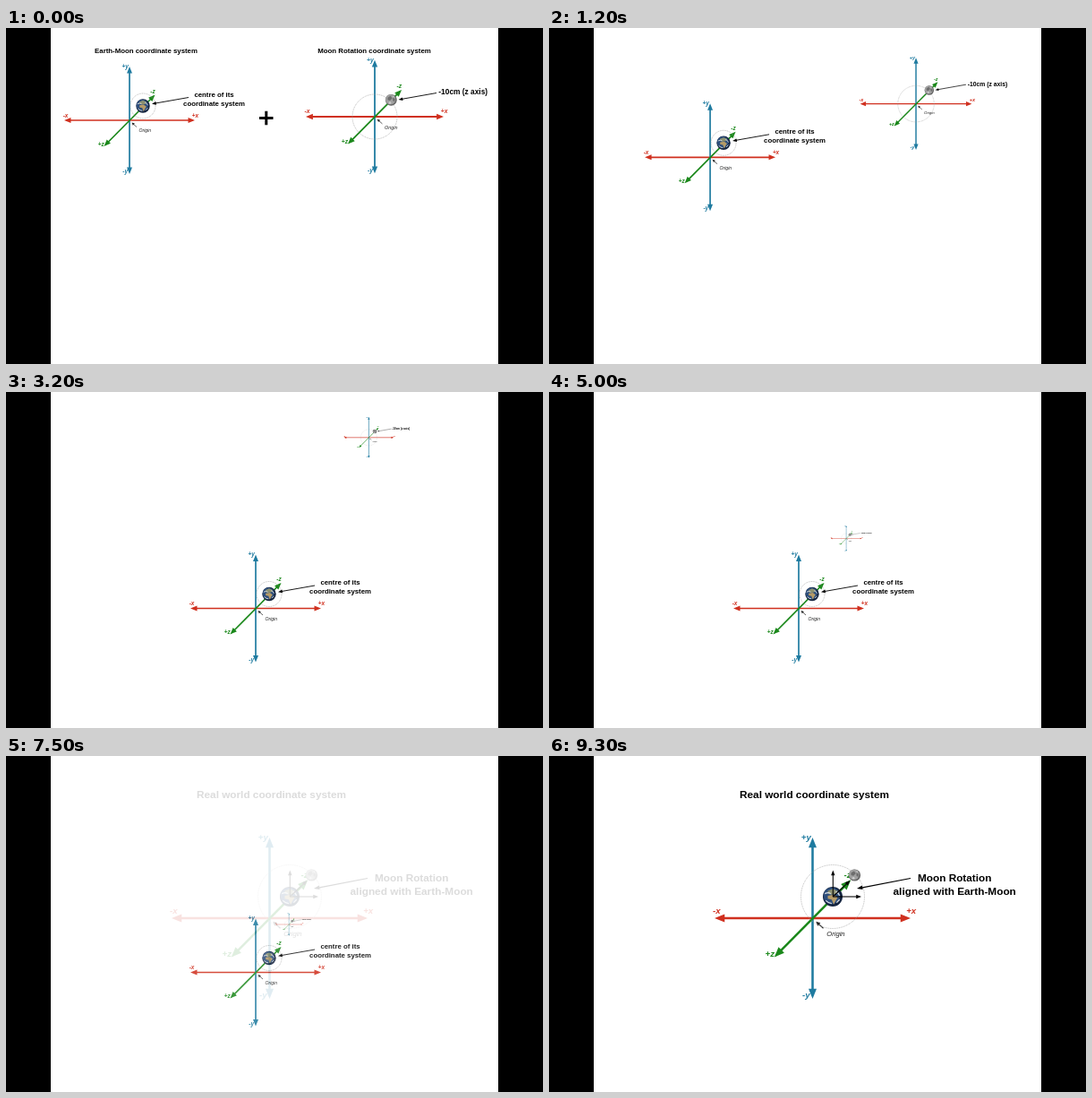
An HTML page that plays this animation: 600x375 px, repeating every 9400 ms.

```html
<!DOCTYPE html>
<html>
<head>
<meta charset="utf-8">
<style>
html, body { margin: 0; width: 100%; height: 100%; overflow: hidden; background: #000; }
svg { display: block; width: 100vw; height: 100vh; }
text { font-family: "Liberation Sans", Arial, sans-serif; text-anchor: middle; }
</style>
</head>
<body>
<svg id="stage" viewBox="0 0 600 375"></svg>
<script>
const RED = '#d0301f', BLUE = '#1f7ba0', GREEN = '#1b881b', BLACK = '#000';

// Text centred on (x, y)
const label = (s, x, y, size, fill = BLACK, style = 'bold') =>
  `<text x="${x}" y="${y + size * 0.36}" fill="${fill}" style="font:${style} ${size}px 'Liberation Sans',Arial,sans-serif">${s}</text>`;

function arrow(x1, y1, x2, y2, color, width, len, half, both) {
  const d = Math.hypot(x2 - x1, y2 - y1), ux = (x2 - x1) / d, uy = (y2 - y1) / d;
  const head = (x, y, s) => {
    const bx = x - ux * len * s, by = y - uy * len * s;
    return `M${x} ${y}L${bx - uy * half} ${by + ux * half}L${bx + uy * half} ${by - ux * half}Z`;
  };
  const cut = len * 0.8, start = both ? cut : 0;
  return `<path d="M${x1 + ux * start} ${y1 + uy * start}L${x2 - ux * cut} ${y2 - uy * cut}" stroke="${color}" stroke-width="${width}"/>
    <path d="${head(x2, y2, 1)}${both ? head(x1, y1, -1) : ''}" fill="${color}"/>`;
}

const axis = (x1, y1, x2, y2, color) => arrow(x1, y1, x2, y2, color, 1.7, 7.5, 3, true);
const callout = (x1, y1, x2, y2, s = 1) => arrow(x1, y1, x2, y2, BLACK, 0.9 * s, 4.8 * s, 1.8 * s);
const orbit = (x, y, r) =>
  `<circle cx="${x}" cy="${y}" r="${r}" fill="none" stroke="#999" stroke-width=".6" stroke-dasharray="1 .7"/>`;

const axes = scale => {
  const mark = (s, x, y, color) => label(s, x, y, 6.4, color, 'italic bold');
  return `<g transform="scale(${scale})">
    ${axis(-73, 0, 73, 0, RED)}${axis(0, -60, 0, 60, BLUE)}${axis(-28.5, 29, 28.5, -28.5, GREEN)}
    ${mark('-x', -71.5, -5.7, RED)}${mark('+x', 73.5, -5.7, RED)}
    ${mark('+y', -4.8, -60.5, BLUE)}${mark('-y', -4.8, 56.8, BLUE)}
    ${mark('-z', 26, -32.5, GREEN)}${mark('+z', -31.8, 26.3, GREEN)}
    ${arrow(8, 7.5, 2.5, 2.5, '#222', 0.7, 3.2, 1.5)}
    ${label('Origin', 17.3, 11.5, 5.1, '#222', 'italic')}</g>`;
};

const earth = (x, y, r) => `<g transform="translate(${x} ${y}) scale(${r / 10})">
  <circle r="10" fill="#14243f"/><circle cx="-1" cy="-1" r="8.4" fill="#2d4e7c"/>
  <path d="M-5 -6L0 -8L5 -6L4 -3L-1 -2L-5 -3Z" fill="#8b9070"/>
  <path d="M-5 -1L1 -2L5 1L3 4L1 8L-1 3L-5 2Z" fill="#b59b68"/>
  <path d="M-8 -3Q-4 -5 -2 -3M3 -5Q6 -4 7 -1M-7 4Q-4 7 -1 7M4 6L7 3" fill="none" stroke="#d5dce2" stroke-width="1.2"/></g>`;

const moon = (x, y, r) => `<g transform="translate(${x} ${y}) scale(${r / 10})">
  <circle r="10" fill="#666"/><circle cx="-1" cy="-1" r="8.8" fill="#a0a0a0"/>
  <path d="M-6 -4L-1 -7L2 -3L-2 1L-6 0ZM3 -4L7 -2L6 3L3 1Z" fill="#6d6d6d"/>
  <circle cx="-2" cy="5" r="2" fill="#ccc"/><circle cx="4" cy="-6" r="1.2" fill="#ccc"/></g>`;

const cross = `<path d="M283 100.5H298.5M290.8 92.7V108.3" stroke="#000" stroke-width="3"/>`;

document.getElementById('stage').innerHTML = `
  <rect width="600" height="375" fill="#000"/>
  <rect x="50" width="500" height="375" fill="#fff"/>
  <g id="titles">
    ${label('Earth-Moon coordinate system', 156.5, 25.3, 7.84)}
    ${label('Moon Rotation coordinate system', 411.5, 25.3, 7.86)}${cross}
  </g>
  <g id="earthSystem">${axes(1)}${orbit(15, -16, 14)}${earth(15, -16, 7.7)}
    ${callout(66, -25.5, 25, -18.3)}
    ${label('centre of its', 94.5, -29, 7.81)}${label('coordinate system', 94.5, -19, 7.81)}
  </g>
  <g id="moonSystem">${axes(1.055)}${orbit(0, 0, 25)}${moon(18.3, -18.7, 6.4)}
    ${callout(69, -26.5, 26.5, -19)}${label('-10cm (z axis)', 98.7, -27.8, 8.36)}
  </g>
  <g id="world">
    <rect x="50" width="500" height="375" fill="#fff"/>
    ${label('Real world coordinate system', 296.5, 42.7, 11.79)}
    <g transform="translate(294.5 181)">${axes(1.5)}</g>
    ${orbit(317, 157, 35.5)}${earth(317, 157, 11)}${moon(341.5, 133, 6.6)}
    ${callout(317.3, 157, 317.3, 127.5, 1.2)}${callout(317.3, 157, 349, 157, 1.2)}${callout(317.3, 157, 336.5, 139, 1.2)}
    ${callout(404, 136.5, 344, 148, 1.3)}
    ${label('Moon Rotation', 453.2, 136, 11.79)}${label('aligned with Earth-Moon', 453.2, 150.3, 11.83)}
  </g>`;

const LOOP = 9400, STEP = 100, MOVE = 1890;
const part = id => document.getElementById(id);
const titles = part('titles'), earthSystem = part('earthSystem'), moonSystem = part('moonSystem'), world = part('world');
const clamp = v => Math.min(1, Math.max(0, v));
const ease = (t, start) => (1 - Math.cos(Math.PI * clamp((t - start) / MOVE))) / 2;
const mix = (a, b, k) => a + (b - a) * k;

// Moon system poses: x, y, scale
const poses = [[412, 99, 1], [405.4, 50.8, 0.363], [316.2, 188, 0.196]];

function draw(now) {
  const t = Math.floor(now % LOOP / STEP) * STEP;
  const first = ease(t, 505), second = ease(t, 3635);
  const [x, y, s] = poses[0].map((v, i) => mix(mix(v, poses[1][i], first), poses[2][i], second));
  titles.setAttribute('opacity', 1 - clamp((t - 505) / 690));
  earthSystem.setAttribute('transform', `translate(${mix(138, 279, first)} ${mix(103, 241.5, first)})`);
  moonSystem.setAttribute('transform', `translate(${x} ${y}) scale(${s})`);
  world.setAttribute('opacity', ease(t, 7050));
}

const begin = performance.now();
function tick() {
  draw(performance.now() - begin);
  requestAnimationFrame(tick);
}
tick();
</script>
</body>
</html>
```
